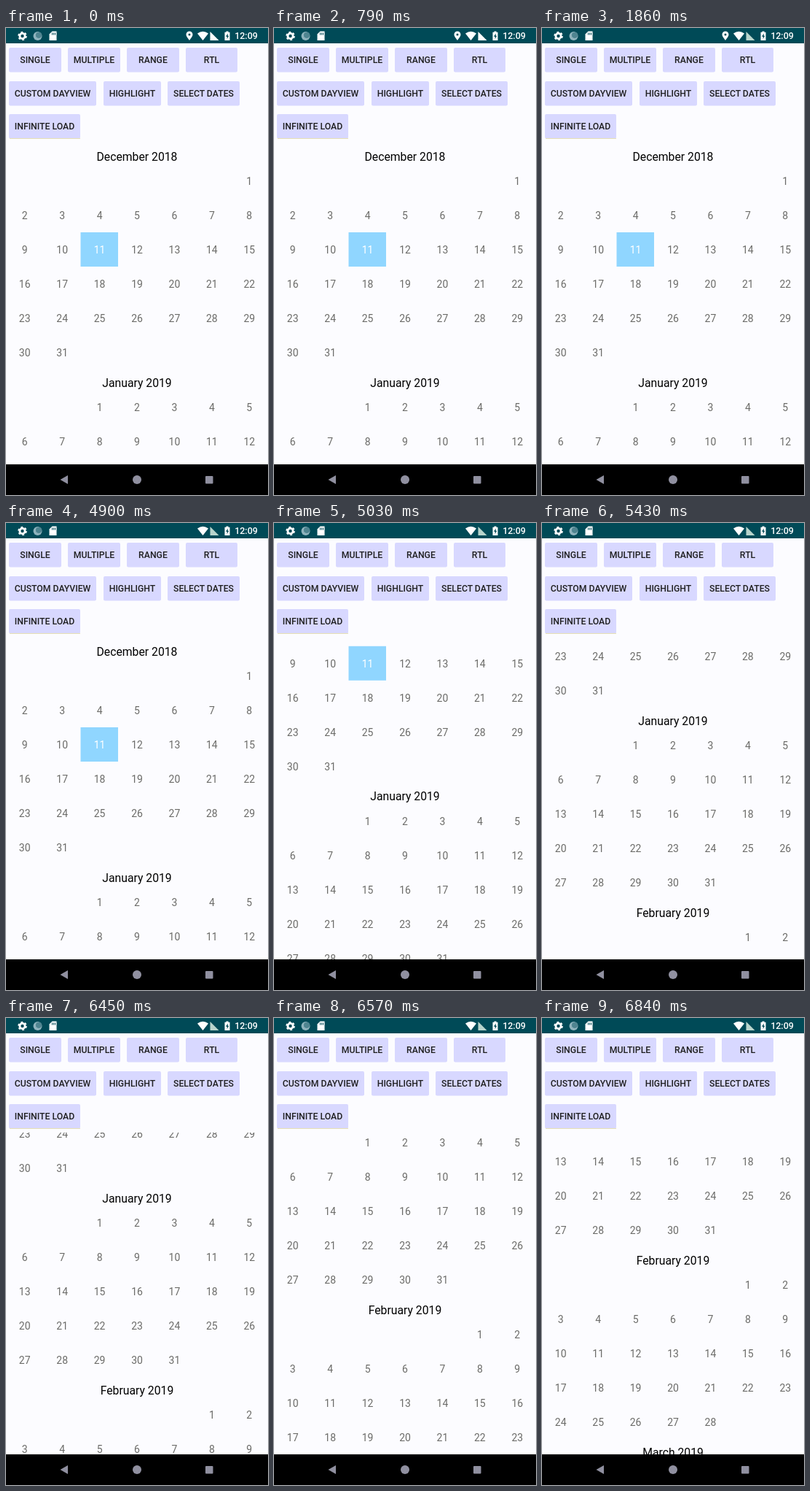
An HTML page that plays this animation: 360 by 640 pixels, repeating every 8 s.

```html
<!DOCTYPE html>
<html lang="en">
<head>
<meta charset="utf-8">
<title>Calendar list</title>
<style>
  html, body { margin: 0; height: 100%; overflow: hidden; background: #fcfcff; }
  svg { display: block; }
  text { font: 14px Roboto, sans-serif; fill: #6b6b68; text-anchor: middle; }
  .title { font-size: 15.75px; fill: #000; }
  .button text { font-size: 12.25px; font-weight: 500; fill: #202020; }
  .button rect { fill: #d8d8ff; }
  .clock { font-size: 12.5px; font-weight: 500; fill: #fff; }
</style>
</head>
<body>
<svg width="360" height="640" viewBox="0 0 360 640">
  <defs><clipPath id="view"><path d="M0 157H360V598H0z"/></clipPath></defs>
  <rect width="360" height="640" fill="#fcfcff"/>
  <path d="M0 594H360V598H0z" fill="#fff"/>
  <g clip-path="url(#view)"><g id="months"></g></g>
  <g id="buttons"></g>
  <path d="M5 151.5H102" stroke="#e6e0b4"/>

  <rect width="360" height="21" fill="#004a57"/>
  <g fill="#fff">
    <circle cx="22.5" cy="11" r="3.6" fill="none" stroke="#fff" stroke-width="2.8"/>
    <circle cx="22.5" cy="11" r="5.5" fill="none" stroke="#fff" stroke-width="1.6" stroke-dasharray="2.88"/>
    <circle cx="43.5" cy="11" r="6" fill="#8fb3bd"/>
    <circle cx="45" cy="9.8" r="4.1" fill="#4f8490"/>
    <path d="M63.5 4.5H69.5V17H59.5V8.5z"/>
    <path d="M63.5 6.5v3M65.5 6.5v3M67.5 6.5v3" stroke="#004a57"/>
    <path id="pin" fill-rule="evenodd" d="M252 17C249 13 247.5 11 247.5 9a4.5 4.5 0 0 1 9 0c0 2-1.5 4-4.5 8zM250.5 9a1.5 1.5 0 0 0 3 0 1.5 1.5 0 0 0-3 0z"/>
    <path d="M263 7.5Q270.5 2 278 7.5L270.5 17z"/>
    <path id="signal" d="M280.5 5V17H292.5z"/>
    <path d="M302.5 4.5h3v1.3h2V17h-7V5.8h2z"/>
    <path d="M304.7 7.5l-2.7 4.2h1.7v3.3l2.5-4.3h-1.5z" fill="#004a57"/>
  </g>
  <text class="clock" x="330" y="15.3">12:09</text>

  <rect y="598" width="360" height="42"/>
  <g fill="#9090a0">
    <path d="M85 613V625L74.5 619z"/>
    <circle cx="180" cy="619" r="6"/>
    <rect x="274" y="614" width="10.5" height="10.5" rx="1"/>
  </g>
</svg>
<script>
const $ = id => document.getElementById(id);
const LOOP = 8000, COLUMN = 360 / 7, ROW = 47;

const label = (x, y, content, attrs = '') =>
  `<text x="${x}" y="${y}" ${attrs}>${content}</text>`;

const button = (x, y, width, name) =>
  `<g class="button"><rect x="${x}" y="${y}" width="${width}" height="33.5" rx="2"/>` +
  label(x + width / 2, y + 21.3, name) + '</g>';

$('buttons').innerHTML = [
  [4, 27, 72, 'SINGLE'], [85, 27, 72, 'MULTIPLE'], [166, 27, 72, 'RANGE'], [247, 27, 71, 'RTL'],
  [4, 73, 120, 'CUSTOM DAYVIEW'], [134, 73, 79, 'HIGHLIGHT'], [222, 73, 99, 'SELECT DATES'],
  [4, 118, 98, 'INFINITE LOAD']
].map(b => button(...b)).join('');

// Each month: name, weekday of the 1st (Sunday = 0), number of days
let titleY = 176, markup = '';
for (const [name, first, days] of [
  ['December 2018', 6, 31], ['January 2019', 2, 31], ['February 2019', 5, 28], ['March 2019', 5, 31]
]) {
  markup += label(180, titleY + 5.5, name, 'class="title"');
  for (let day = 1; day <= days; day++) {
    const cell = first + day - 1;
    const x = (cell % 7 + .5) * COLUMN, y = titleY + 34 + Math.floor(cell / 7) * ROW;
    const selected = name === 'December 2018' && day === 11;
    if (selected) markup += `<rect x="102.5" y="${y - 24}" width="51.5" height="${ROW}" fill="#90d6ff"/>`;
    markup += label(x, y + 5, day, selected ? 'style="fill:#fff"' : '');
  }
  titleY += 34 + Math.floor((first + days - 1) / 7) * ROW + 41;
}
$('months').innerHTML = markup;

// Flick that slows to a stop
const fling = (t, start, end, distance) => {
  const u = Math.min(1, Math.max(0, (t - start) / (end - start)));
  return distance * (1 - (1 - u) ** 2.6);
};

function draw() {
  const t = performance.now() % LOOP;
  const scroll = fling(t, 4902, 5430, 215) + fling(t, 6432, 6840, 202);
  $('months').setAttribute('transform', `translate(0 ${-scroll})`);
  $('pin').setAttribute('visibility', t < 4900 ? 'visible' : 'hidden');
  $('signal').setAttribute('fill', t < 880 ? '#fff' : '#b8d4cc');
  requestAnimationFrame(draw);
}
draw();
</script>
</body>
</html>
```
